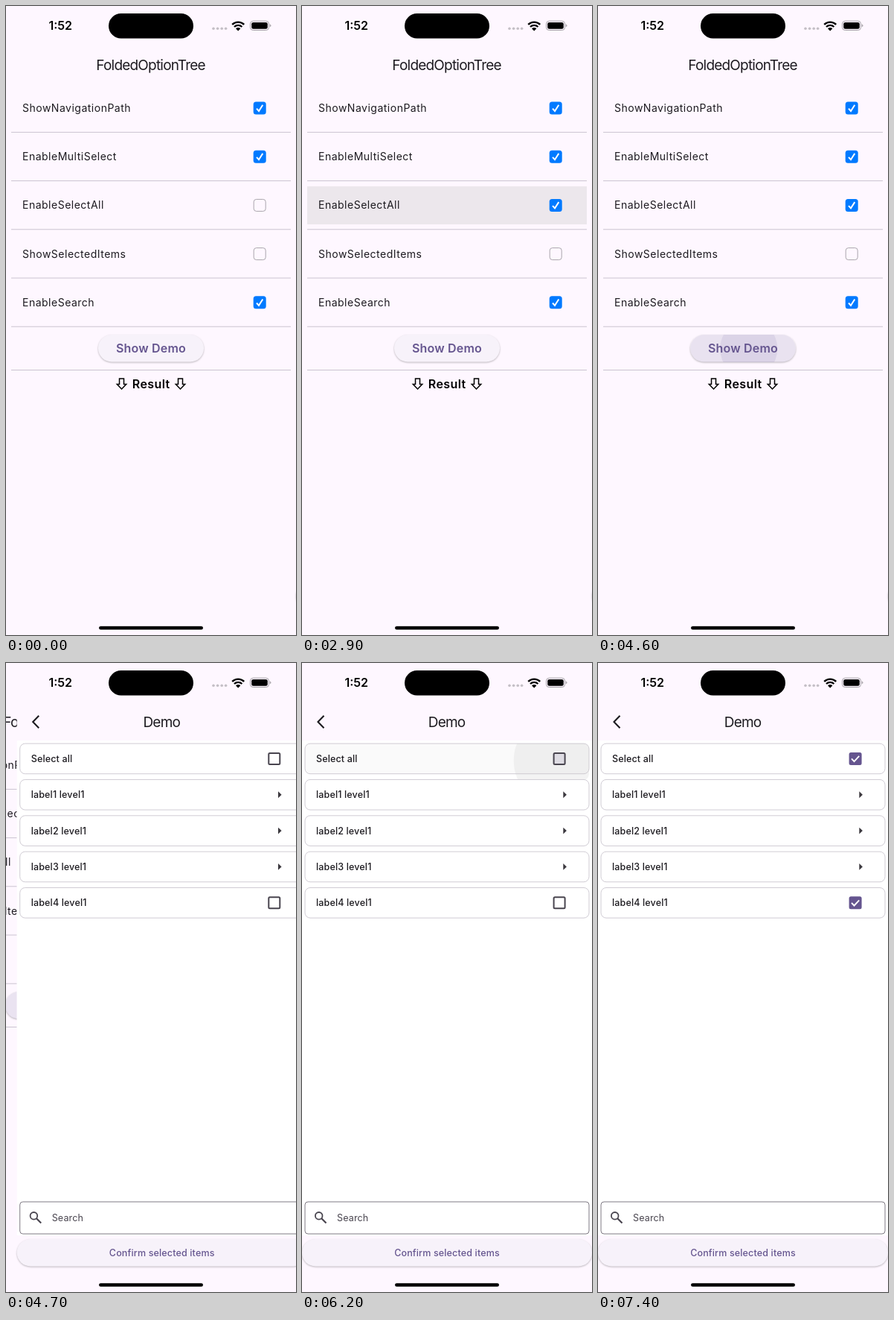
These frames come from a looping animation (390 px wide and 844 px high, 8 s). An HTML page:

```html
<!DOCTYPE html>
<html lang="en">
<head>
<meta charset="utf-8">
<style>
  html, body { margin: 0; width: 100%; height: 100%; overflow: hidden; background: #fef7ff; }
  svg { display: block; width: 100%; height: 100%; font-family: Inter, Roboto, sans-serif; fill: #1d1b20; }
  text { white-space: pre; }
  .mid { text-anchor: middle; }
  .title { font-size: 19px; letter-spacing: -.8px; }
  .option { font-size: 14px; letter-spacing: .5px; }
  .strong { font-size: 16px; font-weight: 600; }
  .item { font-size: 12.5px; font-weight: 500; letter-spacing: .15px; }
  .line { fill: none; stroke-linecap: butt; }
  .raised { fill: #f7f2fa; filter: drop-shadow(0 1px 1px rgba(0,0,0,.26)); }
</style>
</head>
<body>
<svg id="stage" viewBox="0 0 390 844"></svg>
<script>
const LOOP = 8000, STEP = 100;
const SPEED = 2.7; // interface milliseconds per loop millisecond
const PURPLE = '#65558f', SURFACE = '#fef7ff';

const clamp = v => Math.max(0, Math.min(1, v));
const mix = (a, b, p) => a + (b - a) * p;

// cubic-bezier(.25, .1, .25, 1)
function ease(x) {
  let lo = 0, hi = 1;
  for (let i = 0; i < 20; i++) {
    const u = (lo + hi) / 2;
    if (.75 * u * (1 - u) + u ** 3 < x) lo = u; else hi = u;
  }
  return .3 * lo * (1 - lo) ** 2 + 3 * lo * lo * (1 - lo) + lo ** 3;
}

const rect = (x, y, w, h, rx, attrs = '') =>
  `<rect x="${x}" y="${y}" width="${w}" height="${h}" rx="${rx}" ${attrs}/>`;
const text = (x, y, cls, label, attrs = '') =>
  `<text x="${x}" y="${y}" class="${cls}" ${attrs}>${label}</text>`;
const path = (d, color, width, attrs = '') =>
  `<path class="line" d="${d}" stroke="${color}" stroke-width="${width}" ${attrs}/>`;

const taps = {
  row: { box: [7, 242, 376, 51, 0], at: [340, 267], start: 2797, hold: 30,
         splash: '#c8c8c8', press: '#bcbcbc', alpha: .4 },
  button: { box: [124, 441, 142, 37, 18.5], at: [206, 460], start: 4526, hold: 230,
            splash: PURPLE, press: PURPLE, alpha: .1 },
  card: { box: [4, 108, 382, 41, 8], clipHeight: 49, at: [350, 131], start: 6185, hold: 40,
          splash: '#c8c8c8', press: '#bcbcbc', alpha: .4 }
};

function inkMarkup(name) {
  const { box: [x, y, w, h, rx], clipHeight = h, splash, press } = taps[name];
  return `<clipPath id="${name}Clip">${rect(x, y, w, clipHeight, rx)}</clipPath>
    <g clip-path="url(#${name}Clip)">
      ${rect(x, y, w, h, rx, `id="${name}Press" fill="${press}"`)}
      <circle id="${name}Splash" fill="${splash}"/></g>`;
}

function blueBox(y, checked) {
  return checked
    ? rect(332.7, y - 8.5, 17, 17, 3.5, 'fill="#007aff"') +
      path(`M337 ${y + .7}L340 ${y + 4}L345.3 ${y - 4.3}`, '#fff', 2, 'stroke-linecap="round"')
    : rect(333.2, y - 8, 16, 16, 3.5, `fill="${SURFACE}" stroke="#aaa6ad"`);
}

function optionRow(label, i) {
  const y = 137 + 65.2 * i;
  const box = i === 2
    ? `<g id="allOff">${blueBox(y, false)}</g><g id="allOn">${blueBox(y, true)}</g>`
    : blueBox(y, i !== 3);
  return text(22, y + 5, 'option', label) + box + path(`M7 ${y + 32.4}H383`, '#cac4d0', 1);
}

const hollowArrow = x =>
  path(`M${x - 3} 500h6v7.5h3.2l-6.2 6.5l-6.2 -6.5h3.2z`, '#000', 1.5);

const settingsPage = `<g id="settings">
  ${rect(0, 0, 390, 844, 0, `fill="${SURFACE}"`)}
  ${text(194.6, 86, 'title mid', 'FoldedOptionTree')}
  ${inkMarkup('row')}
  ${['ShowNavigationPath', 'EnableMultiSelect', 'EnableSelectAll', 'ShowSelectedItems', 'EnableSearch']
    .map(optionRow).join('')}
  ${rect(124, 441, 142, 36.5, 18.3, 'class="raised"')}
  ${inkMarkup('button')}
  ${text(195, 465, 'strong mid', 'Show Demo', `fill="${PURPLE}" letter-spacing=".2"`)}
  ${path('M7 488.5H383', '#cac4d0', 1)}
  ${hollowArrow(155.5)}${hollowArrow(234.5)}
  ${text(195.2, 512.5, 'strong mid', 'Result', 'fill="#000" letter-spacing=".4"')}
</g>`;

const tickBox = (id, y) =>
  rect(338.6, y - 7.5, 15, 15, 1.5, `id="${id}Box" stroke-width="2"`) +
  path(`M341 ${y}L344.5 ${y + 3.7}L351.2 ${y - 3.5}`, '#fff', 1.9,
    `id="${id}Tick" pathLength="1" stroke-dasharray="1 2"`);

function card(label, i) {
  const y = 128.4 + 48.35 * i;
  const end = i === 0 ? tickBox('select', y) : i === 4 ? tickBox('last', y)
    : `<path d="M351.3 ${y - 4.4}l4.6 4.4l-4.6 4.4z" fill="#3b383e"/>`;
  return rect(4, y - 20.3, 382, 40.6, 7, 'fill="#fff" stroke="#d0ccd4"') +
    (i ? '' : inkMarkup('card')) + text(19, y + 4.5, 'item', label) + end;
}

const demoPage = `<g id="demo">
  ${rect(0, 0, 390, 844, 0, `fill="${SURFACE}"`)}
  ${rect(0, 104, 390, 664, 0, 'fill="#fff"')}
  ${path('M29.5 70.8L21.5 79L29.5 87.2', '#1d1b20', 2.1)}
  ${text(194.6, 86, 'title mid', 'Demo')}
  ${['Select all', 'label1 level1', 'label2 level1', 'label3 level1', 'label4 level1'].map(card).join('')}
  ${rect(4, 723, 382, 43, 4, 'fill="#fff" stroke="#7f7a84"')}
  <circle class="line" cx="22.7" cy="741.8" r="4.8" stroke="#49454f" stroke-width="1.8"/>
  ${path('M26.2 745.3L32.5 751.5', '#49454f', 2.2)}
  ${text(47, 748.7, 'item', 'Search', 'fill="#49454f" style="font-weight:400"')}
  ${rect(0, 773, 390, 36.5, 18.3, 'class="raised"')}
  ${text(195, 796, 'item mid', 'Confirm selected items', `fill="${PURPLE}"`)}
</g>`;

const statusBar = `<g fill="#000">
  ${text(73.2, 32.4, 'strong mid', '1:52')}
  ${rect(138, 10, 114, 33.5, 16.7)}
  ${[279, 284.6, 290.2, 295.6].map(x => `<circle cx="${x}" cy="30.3" r="1.8" fill="#c4bfc6"/>`).join('')}
  ${path('M304.2 24.8A11.6 11.6 0 0 1 320.2 24.8M307 28A7.4 7.4 0 0 1 317.4 28', '#000', 2.4)}
  <path d="M309 30.2a4.6 4.6 0 0 1 6.4 0l-3.2 3.2z"/>
  ${rect(328.5, 20.2, 25, 12.3, 3.8, 'fill="none" stroke="#a5a1a7"')}
  ${rect(330.2, 21.9, 21.6, 8.9, 2.4)}
  <path d="M354.8 24.3q1.6 .6 1.6 2t-1.6 2z" fill="#a5a1a7"/>
  ${rect(125, 832.2, 140, 4.6, 2.3)}
</g>`;

document.getElementById('stage').innerHTML = settingsPage + demoPage + statusBar;

const set = (id, attrs) => {
  const node = document.getElementById(id);
  for (const key in attrs) node.setAttribute(key, attrs[key]);
};

function drawInk(name, time) {
  const { box: [x, y, w, h], at, start, hold, alpha } = taps[name];
  const age = (time - start) * SPEED;
  const released = Math.max(0, age - hold), held = Math.max(0, Math.min(age, hold));
  const grow = ease(clamp(held / 1000 + released / 225));
  const reach = Math.hypot(w, h) / 2;
  set(name + 'Splash', {
    cx: mix(at[0], x + w / 2, grow),
    cy: mix(at[1], y + h / 2, grow),
    r: mix(reach * .3, reach + 5, grow),
    opacity: alpha * clamp(age / 75) * (1 - clamp((released - 225) / 150))
  });
  set(name + 'Press', { opacity: alpha * clamp(clamp(held / 200) - released / 200) });
}

function drawTick(id, progress) {
  const fill = clamp(progress * 2), tick = clamp(progress * 2 - 1);
  set(id + 'Box', {
    fill: PURPLE,
    'fill-opacity': fill,
    stroke: fill > .5 ? PURPLE : '#49454f'
  });
  set(id + 'Tick', { 'stroke-dashoffset': 1 - tick, opacity: tick > 0 ? 1 : 0 });
}

function draw(time) {
  Object.keys(taps).forEach(name => drawInk(name, time));

  const allChecked = time > taps.row.start + taps.row.hold / SPEED;
  set('allOn', { opacity: +allChecked });
  set('allOff', { opacity: +!allChecked });

  const slide = 1 - (1 - clamp((time - 4605) / 185)) ** 4.55;
  set('settings', { transform: `translate(${-130 * slide})` });
  set('demo', { transform: `translate(${390 * (1 - slide)})` });

  const age = (time - taps.card.start) * SPEED;
  drawTick('select', clamp((age - 28) / 200));
  drawTick('last', clamp((age - 41) / 200));
}

function tick() {
  const time = performance.now() % LOOP;
  draw(Math.floor(time / STEP) * STEP);
  requestAnimationFrame(tick);
}
tick();
</script>
</body>
</html>
```
